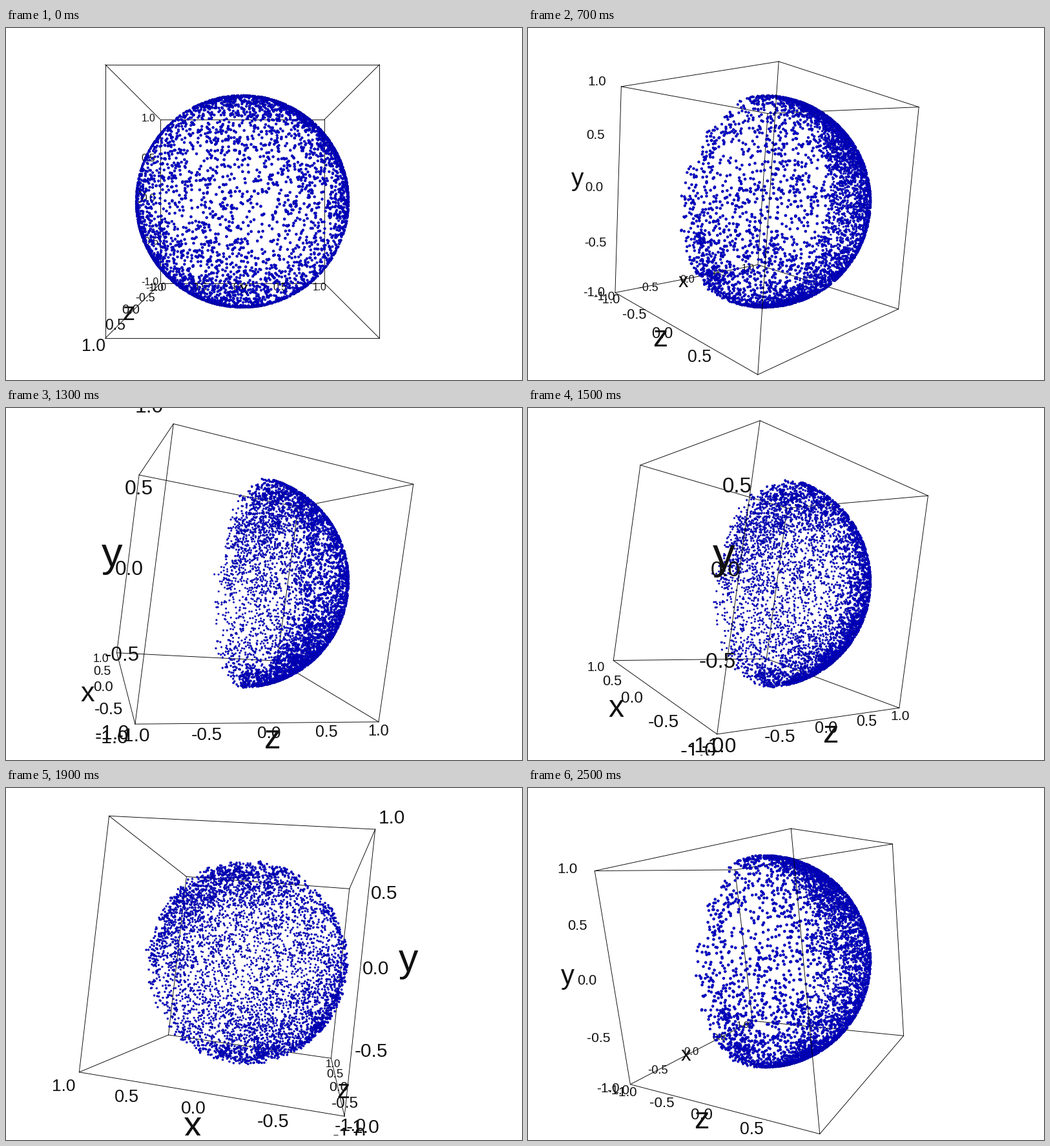
A matplotlib script that plays this animation: 799x546 px, repeating every 2.6 s.

```python
import itertools

import matplotlib.pyplot as plt
import numpy as np
from matplotlib.animation import FuncAnimation

W, H, VIEW_H = 799, 546, 539
DPI = 64
PT = 72 / DPI                      # points per pixel
CENTER = np.array([366.0, 269.0])
FOCAL, DIST = 637.0, 2.0
HOLD = 4                           # extra frames on the opening pose
FRAMES = 26
TURN, LAST = 15.6, 21              # steps where the drag reverses and ends
END_POSE = np.array([55.0, 8.7, 6.2])


def drag(step):
    """Yaw, pitch, roll while the box is dragged steadily to the right."""
    yaw = 18 + 10.15 * step + 2.3 * np.sin(np.pi * (step - 5) / 5)
    pitch = 2.3 + 3.5 * np.cos(np.pi * (step - 3.5) / 10)
    roll = -7.8 + 6.5 * ((10.5 - step) / 9.5) ** 2
    return np.array([yaw, pitch, roll])


def pose(step):
    if step == 0:
        return np.zeros(3)
    if step < TURN:
        return drag(step)
    u = ((step - TURN) / (LAST - TURN)) ** 0.8
    ease = u * u * (3 - 2 * u)
    return drag(TURN) + (END_POSE - drag(TURN)) * ease


def rotation(step):
    yaw, pitch, roll = np.radians(pose(step))
    cy, sy = np.cos(yaw), np.sin(yaw)
    cp, sp = np.cos(pitch), np.sin(pitch)
    cr, sr = np.cos(roll), np.sin(roll)
    ry = np.array([[cy, 0, sy], [0, 1, 0], [-sy, 0, cy]])
    rx = np.array([[1, 0, 0], [0, cp, -sp], [0, sp, cp]])
    rz = np.array([[cr, -sr, 0], [sr, cr, 0], [0, 0, 1]])
    return rz @ rx @ ry


def project(cam):
    """Camera coordinates to screen pixels and distance."""
    depth = DIST - cam[..., 2]
    flat = cam[..., :2] * [1, -1] * FOCAL / depth[..., None]
    return CENTER + flat, depth


def hemisphere(count):
    """Uneven random points on the z > 0 half, thinning out at its rim."""
    rng = np.random.default_rng(11)
    p = rng.normal(size=(count * 8, 3))
    p /= np.linalg.norm(p, axis=1)[:, None]
    p[:, 2] = np.abs(p[:, 2])
    tilt = p @ np.array([0.5, 0.866, 0])
    clumps = np.sin(p @ rng.normal(0, 9, (3, 6))).mean(axis=1)
    chance = (0.32 + 0.6 * tilt ** 2) * (1 + 0.6 * clumps)
    chance *= np.clip(p[:, 2] / 0.24, 0, 1)
    return p[rng.random(len(p)) < chance][:count] * 0.5


points = hemisphere(5000)

corners = np.array(list(itertools.product((-0.5, 0.5), repeat=3)))
edges = [(a, b) for a, b in itertools.combinations(range(8), 2)
         if np.sum(corners[a] != corners[b]) == 1]

fig = plt.figure(figsize=(W / DPI, H / DPI), dpi=DPI, facecolor="white")
ax = fig.add_axes([0, (H - VIEW_H) / H, 1, VIEW_H / H])
ax.set_xlim(0, W)
ax.set_ylim(VIEW_H, 0)
ax.axis("off")

dots = ax.scatter([], [], c="#0000cc", edgecolors="#00008c",
                  linewidths=0.45, zorder=2)
lines = [ax.plot([], [], color="black", lw=0.9 * PT)[0] for _ in edges]


class Label:
    """Screen-facing text held at a point in the box's space."""

    def __init__(self, text, anchor, shift, em, middle):
        self.anchor = np.array(anchor)
        self.shift = np.array([*shift, 0])
        self.em, self.middle = em, middle
        self.art = ax.text(0, 0, text, family="Liberation Sans",
                           color="#111111", ha="center", va="baseline",
                           clip_on=True)

    def place(self, rot):
        (x, y), depth = project(rot @ self.anchor + self.shift)
        size = self.em / depth
        self.art.set_position((x, y + self.middle * size))
        self.art.set_fontsize(size * PT)
        self.art.set_zorder(3 if depth < DIST else 1)


def make_labels():
    out = []
    for t in np.linspace(-1, 1, 5):
        neg = t < 0
        dx = -0.0145 if neg else -0.025
        spots = [
            ((t / 2 - 0.02 * neg, -0.54, -0.565), (dx + 0.008, 0.008)),
            ((-0.565, t / 2, -0.565), (dx + 0.003, 0 if neg else 0.021)),
            ((-0.527, -0.525, t / 2), (dx + 0.01, 0)),
        ]
        out += [Label(f"{t:.1f}", anchor, shift, 40.2, 0.344)
                for anchor, shift in spots]
    out.append(Label("x", (0, -0.57, -0.65), (0.008, 0), 77, 0.264))
    out.append(Label("y", (-0.635, 0, -0.635), (-0.005, 0.037), 77, 0.16))
    out.append(Label("z", (-0.545, -0.545, 0), (-0.006, 0), 77, 0.264))
    return out


labels = make_labels()


def draw(frame):
    rot = rotation(max(0, frame - HOLD))

    xy, depth = project(points @ rot.T)
    order = np.argsort(-depth)
    dots.set_offsets(xy[order])
    dots.set_sizes((6.3 / depth[order] * PT) ** 2)

    xy, depth = project(corners @ rot.T)
    for line, (a, b) in zip(lines, edges):
        line.set_data(*xy[[a, b]].T)
        line.set_zorder(3 if depth[a] + depth[b] < 2 * DIST else 1)

    for label in labels:
        label.place(rot)
    return [dots, *lines, *(label.art for label in labels)]


anim = FuncAnimation(fig, draw, frames=FRAMES, interval=100,
                     init_func=lambda: draw(0), repeat=True, repeat_delay=0)
plt.show()
```
